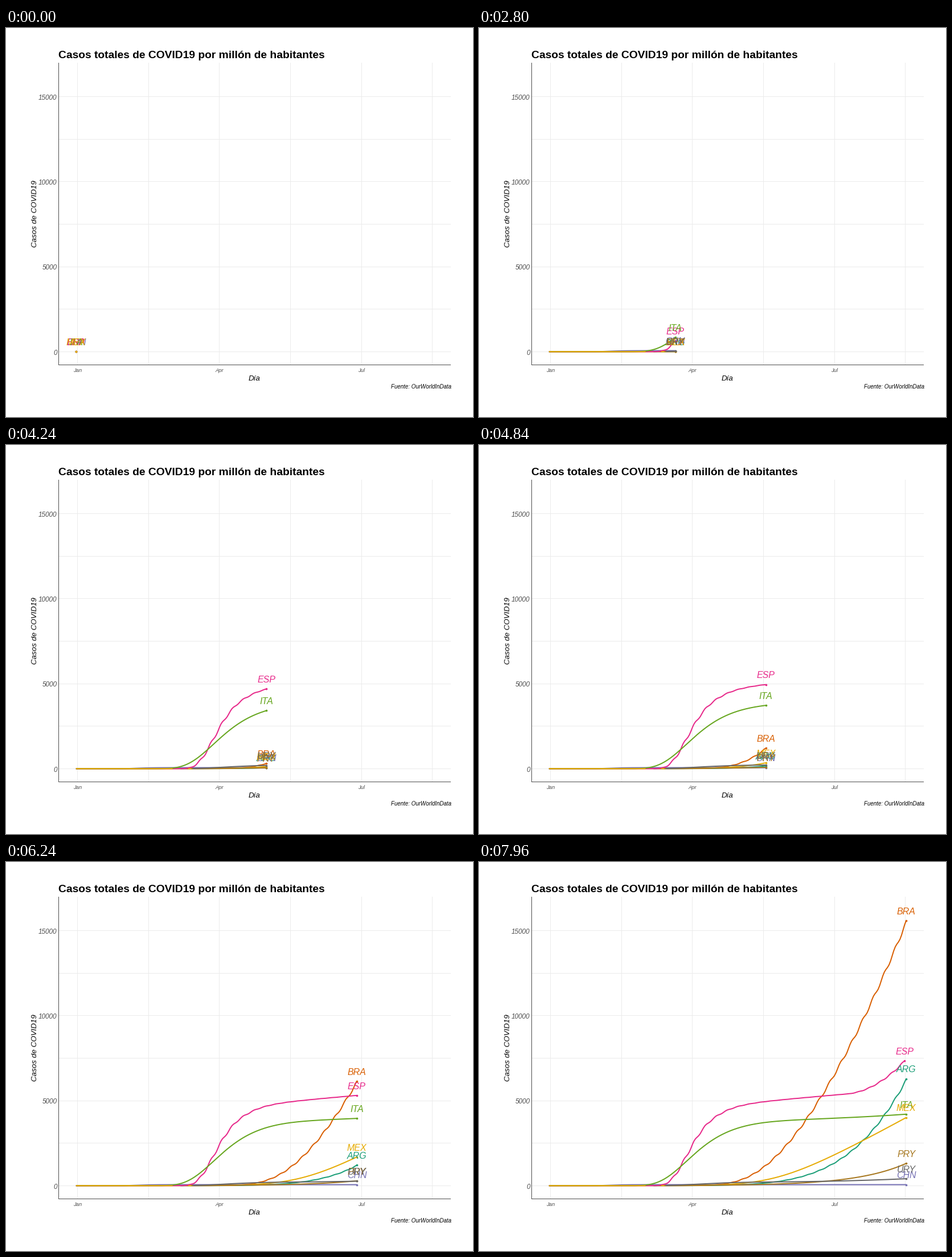
Write a matplotlib script that moves like this. It is 820 px wide and 683 px high and loops after 8 s.

```python
import numpy as np
import matplotlib.pyplot as plt
from matplotlib.animation import FuncAnimation

W, H, DPI = 820, 683, 64
FRAMES, INTERVAL = 200, 40
FIRST, LAST = -1, 228          # days counted from 1 January
X0, PX_DAY = 125.6, 2.739
Y0, PX_CASE = 568.3, 149.2 / 5000

plt.rcParams["font.family"] = "Liberation Sans"


def pt(px):
    return px * 72 / DPI


def day_x(day):
    return X0 + PX_DAY * day


def case_y(cases):
    return Y0 - PX_CASE * cases


def outbreak(t, total, mid, pace):
    """Gompertz curve: fast rise that levels off at `total`."""
    return total * np.exp(-np.exp((mid - t) / pace))


def surge(t, rate, start, power, soft):
    """Power law that sets in softly around `start`."""
    return rate * (soft * np.logaddexp(0, (t - start) / soft)) ** power


def ramp(t, rate, start, power=1):
    return rate * np.maximum(t - start, 0) ** power


def argentina(t):
    return outbreak(t, 172000, 373.2, 121)


def brazil(t):
    return surge(t, 7.89, 117, 1.61, 11)


def china(t):
    return outbreak(t, 60, 37, 6)


def spain(t):
    return outbreak(t, 4750, 87.1, 10.2) + ramp(t, 8, 109) + ramp(t, 1.2, 190, 2)


def italy(t):
    return outbreak(t, 3920, 87.2, 17.1) + ramp(t, 0.037, 140, 2)


def mexico(t):
    return surge(t, 29.1, 140, 1.1, 15)


def paraguay(t):
    return 1310 * np.exp((t - LAST) / 32)


def uruguay(t):
    return outbreak(t, 230, 93, 17) + ramp(t, 0.023, 140, 2)


fig = plt.figure(figsize=(W / DPI, H / DPI), dpi=DPI, facecolor="white")
ax = fig.add_axes([0, 0, 1, 1])
ax.set(xlim=(0, W), ylim=(H, 0))
ax.axis("off")


def hline(y, color, z):
    y = np.floor(y) + 0.5
    ax.plot([92, 781], [y, y], color=color, lw=pt(1), zorder=z,
            solid_capstyle="butt", snap=False)


def vline(x, color, z):
    x = np.floor(x) + 0.5
    ax.plot([x, x], [61, 592], color=color, lw=pt(1), zorder=z,
            solid_capstyle="butt", snap=False)


def label(x, y, text, px, color="black", ha="center", **kw):
    kw.setdefault("style", "italic")
    return ax.text(x, y, text, fontsize=pt(px), color=color, ha=ha,
                   va="baseline", **kw)


for k in range(6):
    vline(day_x(45.5 * k), "#ebebeb", 0)
for k in range(7):
    hline(case_y(2500 * k), "#ebebeb", 0)
vline(92, "#4d4d4d", 1)
hline(591, "#4d4d4d", 1)

label(92, 53.3, "Casos totales de COVID19 por millón de habitantes", 19.2,
      ha="left", style="normal", weight="bold")
label(436.5, 619, "Día", 13.4)
label(54, 326.5, "Casos de COVID19", 13.4, rotation=90, rotation_mode="anchor")
label(781.5, 633, "Fuente: OurWorldInData", 9.8, ha="right")
for v in range(0, 15001, 5000):
    label(89.5, case_y(v) + 5.4, str(v), 11.7, "#4d4d4d", ha="right")
for day, month in ((0, "Jan"), (91, "Apr"), (182, "Jul")):
    label(day_x(day), 604, month, 9.4, "#4d4d4d")


class Country:
    def __init__(self, code, color, curve, start=FIRST, end=LAST,
                 wave=0, low=201.5, gap=(0, 0)):
        self.days = np.arange(start, end + 1)
        # weekly reporting rhythm, slowest around day `low`
        t = self.days - wave * np.sin(2 * np.pi * (self.days - low) / 7)
        self.x, self.y = day_x(self.days), case_y(curve(t))
        missing = (self.days >= gap[0]) & (self.days < gap[1])
        self.path = np.where(missing, np.nan, self.y)
        self.line, = ax.plot([], [], color=color, lw=pt(2), zorder=3,
                             solid_capstyle="butt", solid_joinstyle="round")
        self.dot, = ax.plot([], [], "o", color=color, ms=pt(3.7), mew=0, zorder=4)
        self.tag = label(0, 0, code, 16, color, zorder=5)

    def show(self, day):
        n = int(np.searchsorted(self.days, day, side="right"))
        tip = slice(max(n - 1, 0), n)
        self.line.set_data(self.x[:n], self.path[:n])
        self.dot.set_data(self.x[tip], self.y[tip])
        self.tag.set_visible(n > 0)
        if n:
            self.tag.set_position((self.x[n - 1], self.y[n - 1] - 11.3))


countries = [
    Country("ARG", "#1b9e77", argentina, start=66, wave=0.4),
    Country("BRA", "#d95f02", brazil, wave=0.5),
    Country("CHN", "#7570b3", china),
    Country("ESP", "#e7298a", spain, end=LAST - 1, wave=0.5, low=213),
    Country("ITA", "#66a61e", italy),
    Country("MEX", "#e6ab02", mexico, gap=(62, 71)),
    Country("PRY", "#a6761d", paraguay, start=73),
    Country("URY", "#666666", uruguay, start=74),
]


def update(frame):
    day = round(FIRST + (LAST - FIRST) * frame / (FRAMES - 1))
    for c in countries:
        c.show(day)
    return []


anim = FuncAnimation(fig, update, frames=FRAMES, interval=INTERVAL,
                     init_func=lambda: update(0), repeat=True, repeat_delay=0)
plt.show()
```
